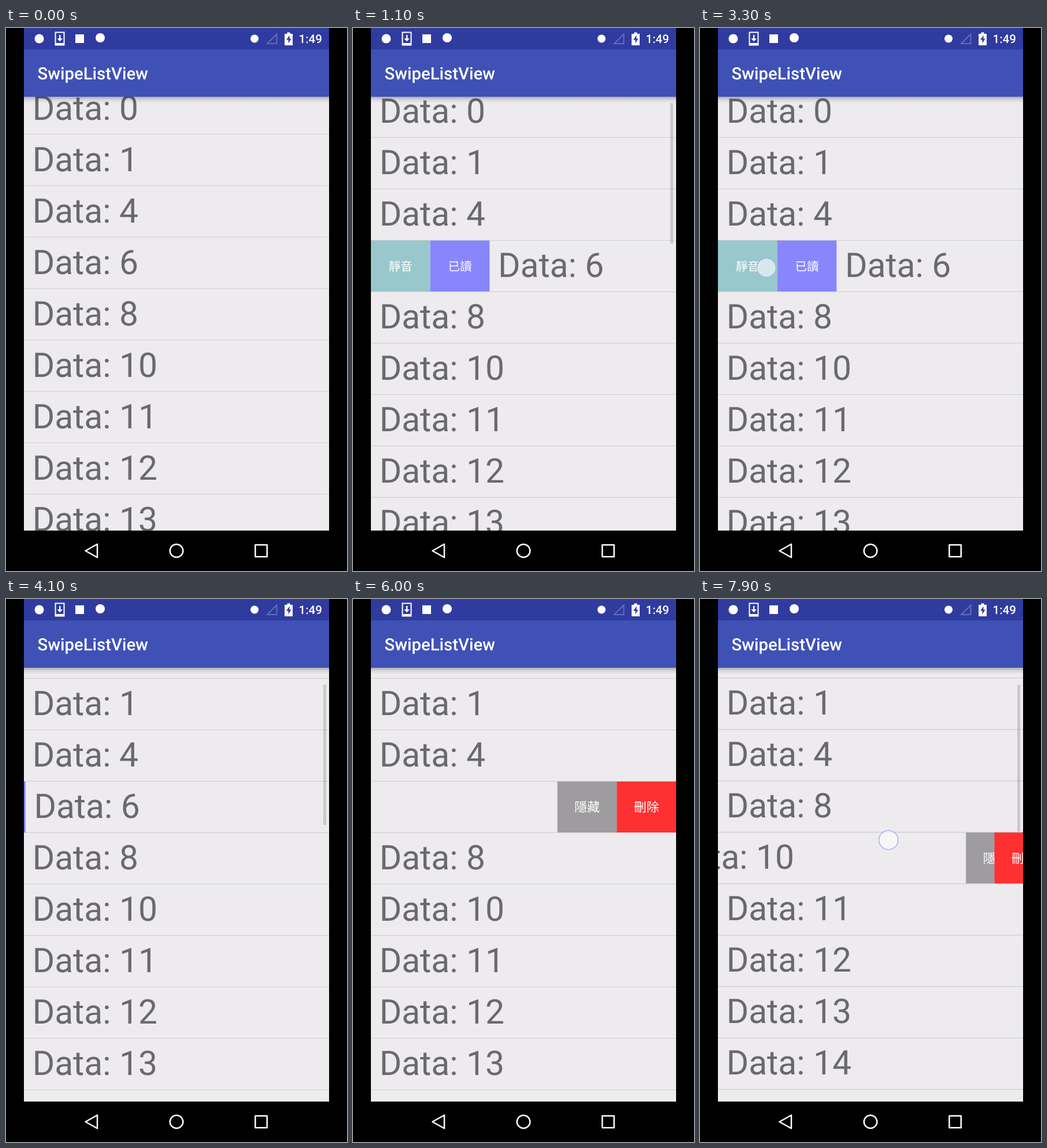
These frames come from a looping animation (590 by 940 pixels, 8000 ms). An HTML page:

```html
<!DOCTYPE html>
<html lang="zh-Hant">
<head>
<meta charset="utf-8">
<title>SwipeListView</title>
<style>
  html, body { margin: 0; width: 100%; height: 100%; overflow: hidden; background: #000; }
  svg { display: block; width: 590px; height: 940px; font-family: Roboto, sans-serif; text-rendering: geometricPrecision; }
  .row text { font-size: 58.67px; fill: #6a696c; }
  .row path { stroke: #cecdd0; stroke-width: 1.2; }
  .btn text { font-family: "Noto Sans CJK TC", "Noto Sans CJK JP", "Noto Sans CJK", sans-serif; fill: #fff; text-anchor: middle; }
  .line { fill: none; stroke: #fff; }
</style>
</head>
<body>
<svg viewBox="0 0 590 940">
  <defs>
    <clipPath id="list"><rect x="31" y="119" width="528" height="751"/></clipPath>
    <linearGradient id="shade" x1="0" y1="0" x2="0" y2="1">
      <stop offset="0" stop-color="#000" stop-opacity=".28"/>
      <stop offset=".45" stop-color="#000" stop-opacity=".1"/>
      <stop offset="1" stop-color="#000" stop-opacity="0"/>
    </linearGradient>
  </defs>
  <rect width="590" height="940"/>

  <g clip-path="url(#list)">
    <rect x="31" y="119" width="528" height="751" fill="#edebee"/>
    <g id="rows"></g>
    <g id="menu"></g>
    <rect id="bar" x="549" width="5" fill="#000" fill-opacity=".15"/>
    <rect x="31" y="119" width="528" height="11" fill="url(#shade)"/>
    <circle id="touch" r="16.5" fill="#fff" fill-opacity=".6" stroke="#a9aeea" stroke-opacity=".8" stroke-width="1.8"/>
  </g>

  <rect x="31" width="528" height="37" fill="#303b9f"/>
  <rect x="31" y="37" width="528" height="82" fill="#3f51b5"/>
  <text x="54.5" y="89" font-size="29.3" font-weight="500" fill="#fff">SwipeListView</text>

  <!-- status bar -->
  <g fill="#fff">
    <circle cx="57.5" cy="18.5" r="8"/>
    <rect class="line" x="85.5" y="7.5" width="15" height="22" stroke-width="2"/>
    <path d="M85 26h16v4h-16zM92 12h2.4v6h3.6l-4.8 5.2-4.8-5.2h3.6z"/>
    <rect x="120" y="11" width="15" height="15"/>
    <circle cx="163" cy="17" r="8"/>
    <circle cx="430" cy="18.5" r="7"/>
    <path class="line" d="M468.5 10.5v16.5h-16.5z" style="stroke:#626cbc" stroke-width="2"/>
    <path d="M482 10h4.5v-2.500h5v2.500h4.500v20h-14z"/>
    <path d="M490.500 12.500l-5.500 8h3.500v6l5-8h-3z" fill="#303b9f"/>
    <text x="506.500" y="26" font-size="20.5" font-weight="500">1:49</text>
  </g>

  <!-- navigation bar -->
  <g class="line" stroke-width="2.5" stroke-linejoin="round">
    <path d="M137.500 905l20.500-11.500v23z"/>
    <circle cx="295" cy="905" r="11.300"/>
    <rect x="431.300" y="894.800" width="20.400" height="20.400"/>
  </g>
</svg>
<script>
const LOOP = 8000, STEP = 100, PITCH = 89, ROW = 88, LEFT = 31, RIGHT = 559;
const OPEN = 205.3, BTN = OPEN / 2, REMOVED_AT = 7100;
const $ = id => document.getElementById(id);

const clamp = k => Math.min(1, Math.max(0, k));
// progress 0..1 of a move: eased at both ends, or slowing down
const drag = (t, start, dur) => { const k = clamp((t - start) / dur); return k * k * (3 - 2 * k); };
const glide = (t, start, dur) => 1 - (1 - clamp((t - start) / dur)) ** 2.4;

const isRemoved = t => t >= REMOVED_AT;
const listTop = t => 95.5 + 5.5 * drag(t, 500, 200) - 52 * glide(t, 3800, 300) - (isRemoved(t) ? 0.7 : 0);
const swipe = t => OPEN * (isRemoved(t)
  ? -drag(t, 7700, 410)
  : drag(t, 500, 600) - glide(t, 3800, 360) - glide(t, 4400, 600));

// scroll bar: shown from, starts fading
const wakes = [[600, 1200], [3800, 4300], [REMOVED_AT, LOOP]];
const barAlpha = t => Math.max(...wakes.map(([on, off]) => t < on ? 0 : clamp(1 - (t - off) / 400)));

// finger contacts: start, end, x, y inside the row
const tap = x => t => [t, t + 150, x, 47];
const touches = [
  [500, 950, 236, 40], [4400, 4820, 483, 22], [7800, 8200, 425, 13],
  ...[2000, 2400].map(tap(186)),
  ...[2900, 3300].map(tap(115)),
  ...[5400, 5800].map(tap(410)),
  tap(508)(6900)
];

function add(parent, tag, attrs, text) {
  const el = document.createElementNS("http://www.w3.org/2000/svg", tag);
  for (const k in attrs) el.setAttribute(k, attrs[k]);
  if (text) el.textContent = text;
  return parent.appendChild(el);
}

const move = (el, x, y) => el.setAttribute("transform", `translate(${x} ${y})`);

const rows = [0, 1, 4, 6, 8, 10, 11, 12, 13, 14, 15].map(n => {
  const g = add($("rows"), "g", { class: "row" });
  const label = add(g, "text", { x: 45.7, y: 63 }, "Data: " + n);
  add(g, "path", { d: `M${LEFT} 88.5H${RIGHT}` });
  return { n, g, label };
});

function button(text, fill, size) {
  const g = add($("menu"), "g", { class: "btn" });
  add(g, "rect", { width: BTN, height: ROW, fill });
  add(g, "text", { x: BTN / 2, y: 44 + size * 0.38, "font-size": size }, text);
  return g;
}
const mute = button("靜音", "#98c8cc", 20.5);
const read = button("已讀", "#8986fd", 20.5);
const hide = button("隱藏", "#9e9c9f", 22);
const drop = button("刪除", "#ff3031", 22);

function draw(t) {
  const top = listTop(t), shift = swipe(t), removed = isRemoved(t);
  const active = removed ? 10 : 6;
  let y = top, rowY = top;
  for (const r of rows) {
    const gone = removed && r.n === 6;
    r.g.style.display = gone ? "none" : "";
    if (gone) continue;
    move(r.g, 0, y);
    move(r.label, r.n === active ? shift : 0, 0);
    if (r.n === active) rowY = y;
    y += PITCH;
  }

  const right = Math.max(shift, 0), left = Math.min(shift, 0);
  move(mute, LEFT + right / 2 - BTN, rowY);
  move(read, LEFT + right - BTN, rowY);
  move(hide, RIGHT + left, rowY);
  move(drop, RIGHT + left / 2, rowY);

  $("bar").setAttribute("y", 130 + (101 - top) * 0.35);
  $("bar").setAttribute("height", removed ? 254 : 243);
  $("bar").style.opacity = barAlpha(t);

  const hit = touches.find(([start, end]) => t >= start && t < end);
  $("touch").style.display = hit ? "" : "none";
  if (hit) {
    const [, end, x, dy] = hit;
    const dragging = end - hit[0] > 150;
    move($("touch"), x + (dragging ? shift : 0), rowY + dy);
    $("touch").style.opacity = clamp((end - t) / 150);
  }
}

const start = performance.now();
function tick() {
  const t = (performance.now() - start) % LOOP;
  draw(Math.floor(t / STEP) * STEP);
  requestAnimationFrame(tick);
}
tick();
</script>
</body>
</html>
```
